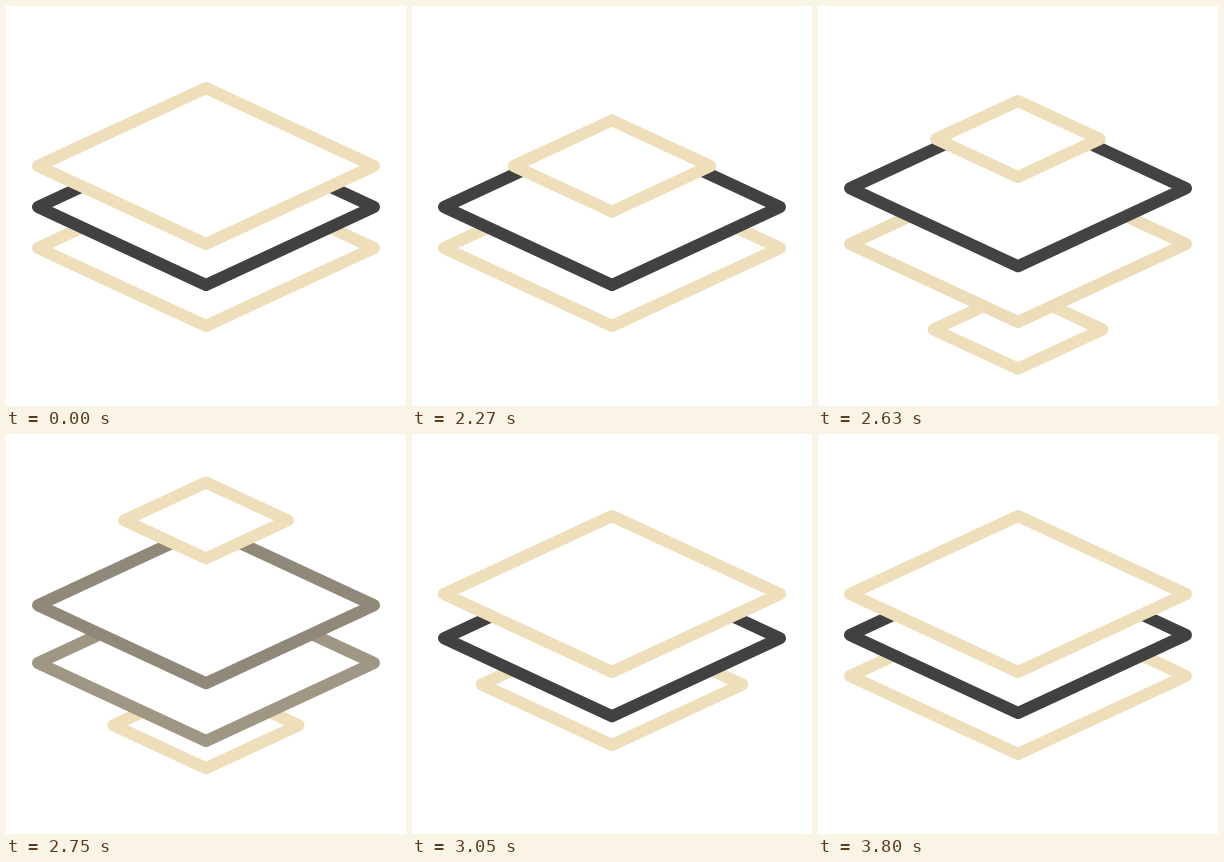
These frames come from a looping animation (400x400 px, 3.83 s). An HTML page with a canvas:

```html
<!DOCTYPE html>
<html>
<head>
<meta charset="utf-8">
<style>
  html, body { margin: 0; width: 100%; height: 100%; overflow: hidden; background: #fff; }
  canvas { display: block; width: 400px; height: 400px; }
</style>
</head>
<body>
<canvas id="stage" width="400" height="400"></canvas>
<script>
const ctx = document.getElementById('stage').getContext('2d');
const LOOP = 3830, HOLD = 2030, STEP = 30;
const TAN = [238, 223, 186], DARK = [65, 65, 66];
const TOP = 160, MID = 201, LOW = 242;

const lerp = (a, b, p) => a + (b - a) * p;
const mix = (a, b, p) => a.map((v, i) => Math.round(lerp(v, b[i], p)));

// Eased progress along the curve cubic-bezier(p1, 0, p2, 1)
function ease(k, start, end, p1 = 1 / 3, p2 = 2 / 3) {
  const x = Math.min(1, Math.max(0, (k - start) / (end - start)));
  let lo = 0, hi = 1, t = x;
  for (let i = 0; i < 24; i++) {
    t = (lo + hi) / 2;
    const u = 1 - t;
    if (3 * p1 * t * u * u + 3 * p2 * t * t * u + t * t * t < x) lo = t;
    else hi = t;
  }
  return t * t * (3 - 2 * t);
}

function sheet(y, scale, color) {
  const a = 168 * scale, b = 78 * scale;
  ctx.beginPath();
  ctx.moveTo(200, y - b);
  ctx.lineTo(200 + a, y);
  ctx.lineTo(200, y + b);
  ctx.lineTo(200 - a, y);
  ctx.closePath();
  ctx.fillStyle = '#fff';
  ctx.fill();
  ctx.strokeStyle = `rgb(${color})`;
  ctx.stroke();
}

function draw(now) {
  const t = now % LOOP;
  const k = t < HOLD ? -1 : Math.floor((t - HOLD) / STEP);
  const tint = ease(k, 19.3, 29.3);

  ctx.clearRect(0, 0, 400, 400);
  ctx.lineWidth = 12;
  ctx.lineJoin = 'round';

  // Back to front: entering, low to middle, middle to top, leaving
  if (k > 17) {
    sheet(lerp(334.5, LOW, ease(k, 17, 44, 0.2, 0.2)),
          lerp(0.5, 1, ease(k, 19, 55, 0.23, 0.46)), TAN);
  }
  sheet(lerp(LOW, MID, ease(k, 15.7, 37.8)), 1, mix(TAN, DARK, tint));
  sheet(lerp(MID, TOP, ease(k, 9.7, 31.5)), 1, mix(DARK, TAN, tint));
  if (k < 27) {
    sheet(lerp(TOP, 70, ease(k, 16, 27)), lerp(1, 0.487, ease(k, -1, 11.5)), TAN);
  }
}

const begin = performance.now();
function tick() {
  draw(performance.now() - begin);
  requestAnimationFrame(tick);
}
tick();
</script>
</body>
</html>
```
